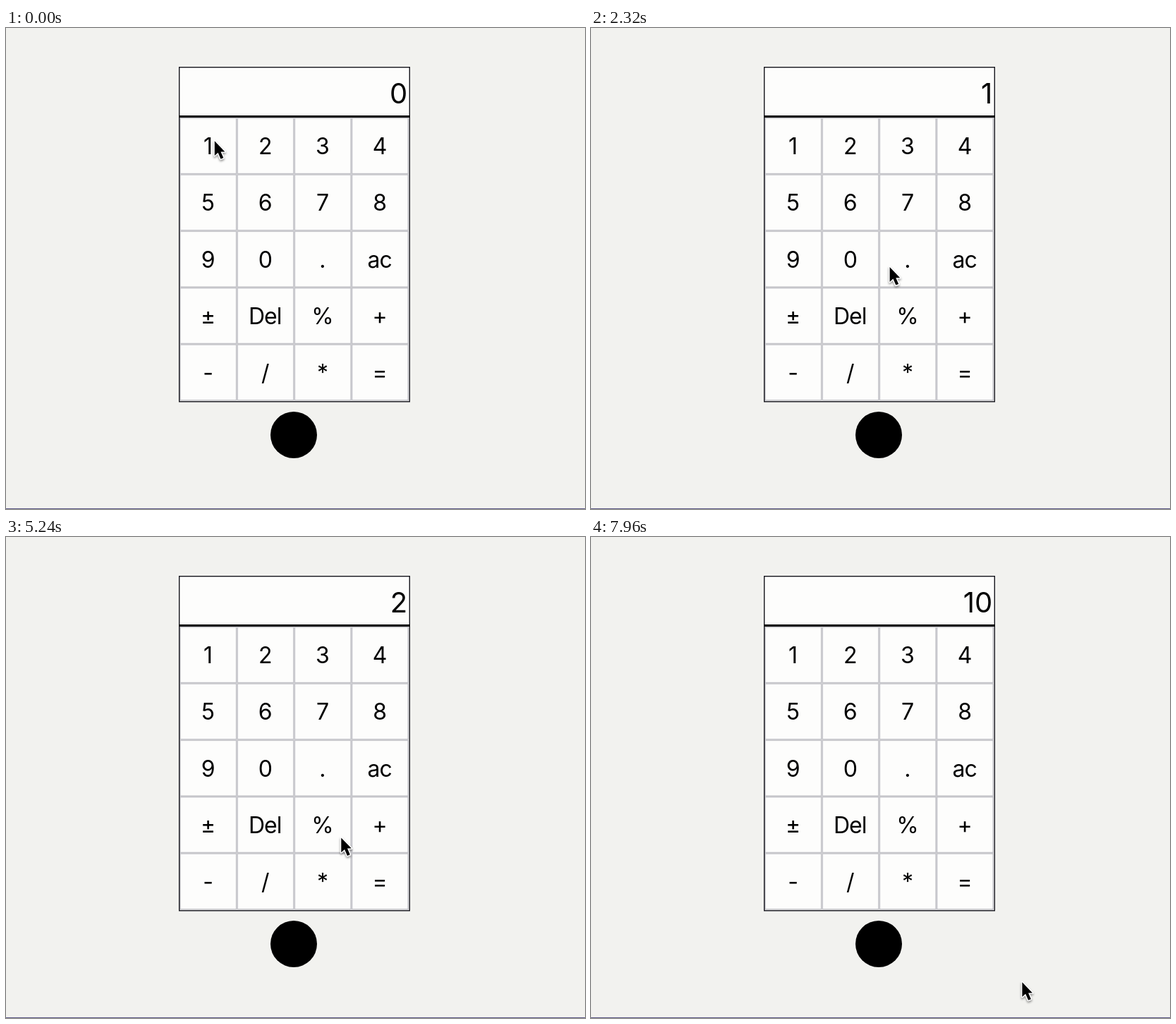
These frames come from a looping animation (821x682 px, 8 s). An HTML page:

```html
<!DOCTYPE html>
<html lang="en">
<head>
<meta charset="utf-8">
<title>Calculator</title>
<style>
  html, body { margin: 0; width: 100%; height: 100%; overflow: hidden; background: #f2f2ef; }
  svg { display: block; width: 821px; height: 682px; }
  text { font-family: Inter, "Liberation Sans", sans-serif; font-size: 32px; letter-spacing: -0.03em; text-anchor: middle; }
  #display { font-size: 40px; letter-spacing: 0; text-anchor: end; }
  .key { fill: #fdfdfc; stroke: #c3c3c8; stroke-width: 1.5; }
  .frame { fill: none; stroke: #15151c; stroke-width: 1.4; }
  .cursor { stroke: #fff; stroke-width: 3; stroke-linejoin: round; paint-order: stroke; filter: drop-shadow(0 2px 1.5px #0006); }
</style>
</head>
<body>
<svg viewBox="0 0 821 682">
  <rect x="246" y="56" width="326" height="474" fill="#fdfdfc"/>
  <g id="keys"></g>
  <rect class="frame" x="245.7" y="55.7" width="326.6" height="474.1"/>
  <rect x="245" y="124" width="328" height="3"/>
  <text id="display" x="569.2" y="106.5">0</text>
  <circle cx="408" cy="577" r="33"/>
  <rect y="681" width="821" height="1" fill="#5f5b88"/>
  <path id="cursor" class="cursor" d="M0 0V20.8L4.8 16.5L8.7 25.5L12.5 23.9L8.7 15.2H14.6Z"/>
</svg>
<script>
const LOOP = 8000;
const GLIDE = 600; // longest time the pointer takes from key to key
const KEY = { w: 81.2, h: 80.3, left: 246.2, top: 127 };
const labels = '1 2 3 4 5 6 7 8 9 0 . ac ± Del % + - / * ='.split(' ');

const display = document.getElementById('display');
const cursor = document.getElementById('cursor');

function center(label) {
  const i = labels.indexOf(label);
  return {
    x: KEY.left + (i % 4 + 0.5) * KEY.w,
    y: KEY.top + (Math.floor(i / 4) + 0.5) * KEY.h
  };
}

// The pointer reaches a spot near a key at a given time, then rests there.
function stop(time, label, dx = 0, dy = 0) {
  const { x, y } = center(label);
  return { time, x: x + dx, y: y + dy };
}

const stops = [
  stop(0, '1', 9, -7),
  stop(800, '=', 22, 7),
  stop(1200, '+', 10, 10),
  stop(1700, '1', 5, 5),
  stop(2600, '=', 0, -14),
  stop(4900, '%', 23, 23),
  stop(5760, 'ac', 5, 10),
  stop(6560, '=', 81, 143)
];

const readings = [
  { time: 0, value: '0' },
  { time: 120, value: '1' },
  { time: 3480, value: '2' },
  { time: 5960, value: '0' },
  { time: 7640, value: '1' },
  { time: 7840, value: '10' }
];

document.getElementById('keys').innerHTML = labels.map(label => {
  const { x, y } = center(label);
  return `<rect class="key" x="${x - KEY.w / 2 + 0.75}" y="${y - KEY.h / 2 + 0.75}"
      width="${KEY.w - 1.5}" height="${KEY.h - 1.5}"/>
    <text x="${x - 0.7}" y="${y + 12}">${label}</text>`;
}).join('');

const smooth = u => u * u * (3 - 2 * u);

function pointerAt(t) {
  const i = stops.findLastIndex(s => s.time <= t);
  const from = stops[i];
  const to = stops[i + 1] ?? from;
  const duration = Math.min(GLIDE, to.time - from.time) || 1;
  const u = smooth(Math.min(1, Math.max(0, 1 - (to.time - t) / duration)));
  return { x: from.x + (to.x - from.x) * u, y: from.y + (to.y - from.y) * u };
}

function draw() {
  const t = performance.now() % LOOP;
  const { x, y } = pointerAt(t);
  cursor.setAttribute('transform', `translate(${x.toFixed(1)} ${y.toFixed(1)})`);
  display.textContent = readings.findLast(r => r.time <= t).value;
  requestAnimationFrame(draw);
}
draw();
</script>
</body>
</html>
```
